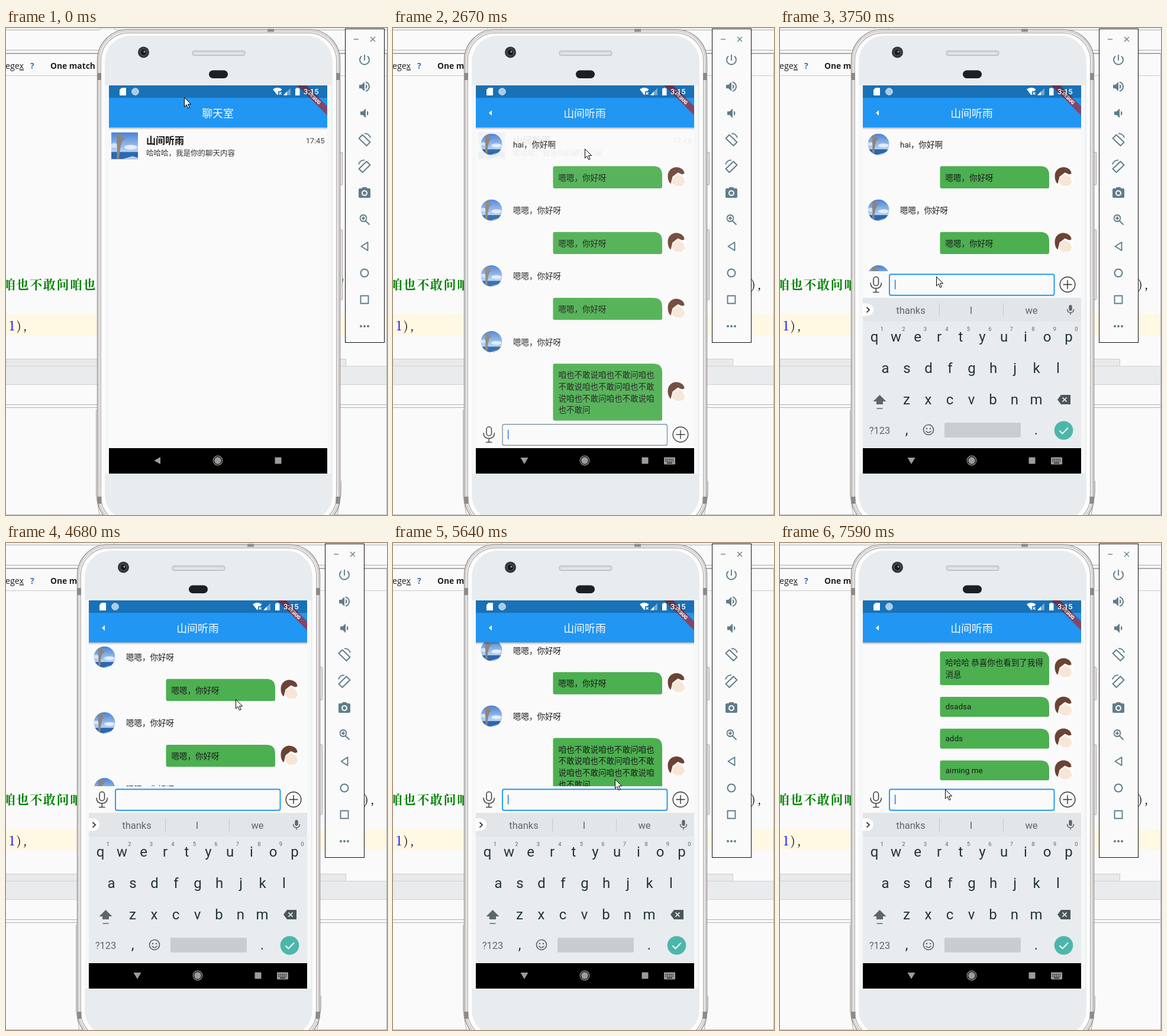
Animation of 644 by 823 pixels, one loop 8 s. Source, as an HTML page:

```html
<!DOCTYPE html>
<html lang="zh">
<head>
<meta charset="utf-8">
<style>
html, body { margin: 0; width: 100%; height: 100%; overflow: hidden; background: #fafafa; }
svg { display: block; width: 100vw; height: 100vh; }
text { font-family: Roboto, "Noto Sans CJK SC", "Noto Sans CJK", sans-serif; white-space: pre; }
.ui { font-family: "Open Sans", "Noto Sans", sans-serif; }
.code { font-family: "Noto Serif CJK SC", "Noto Serif", "Noto Sans CJK SC", serif; }
.mid { text-anchor: middle; }
.end { text-anchor: end; }
</style>
</head>
<body>
<svg id="stage" viewBox="0 0 644 823"></svg>
<script>
const LOOP = 8000, NAME = '山间听雨', BLUE = '#2196f3', STEEL = '#607d8b';

const rect = (x, y, w, h, fill, more = '') =>
  `<rect x="${x}" y="${y}" width="${w}" height="${h}" fill="${fill}" ${more}/>`;
const circle = (x, y, r, fill, more = '') => `<circle cx="${x}" cy="${y}" r="${r}" fill="${fill}" ${more}/>`;
const path = (d, fill, more = '') => `<path d="${d}" fill="${fill}" ${more}/>`;
const line = (d, color, w = 1, more = '') => path(d, 'none', `stroke="${color}" stroke-width="${w}" ${more}`);
const text = (x, y, size, str, fill, more = '') =>
  `<text x="${x}" y="${y}" font-size="${size}" fill="${fill}" ${more}>${str}</text>`;
const at = (x, y, body, more = '') => `<g transform="translate(${x} ${y}) ${more}">${body}</g>`;
const group = (id, body, more = '') => `<g id="${id}" ${more}>${body}</g>`;
const clip = (id, body) => `<clipPath id="${id}">${body}</clipPath>`;

function defs() {
  const shadow = '<stop stop-opacity=".28"/><stop offset="1" stop-opacity="0"/>';
  const sky = '<stop stop-color="#4b82d4"/><stop offset=".7" stop-color="#b4d1f2"/>';
  const down = 'x1="0" y1="0" x2="0" y2="1"';
  return `<defs>
    <linearGradient id="shadow" ${down}>${shadow}</linearGradient>
    <linearGradient id="sky" ${down}>${sky}</linearGradient>
    ${clip('screenClip', rect(140, 97, 369, 656, '#000'))}
    ${clip('listClip', rect(140, 168, 369, 497, '#000', 'id="listBox"'))}
    ${clip('kbClip', rect(140, 456, 369, 254, '#000'))}
    ${clip('round', circle(22.5, 22.5, 22.5, '#000'))}
    <g id="sea">
      ${rect(0, 0, 45, 45, 'url(#sky)')}
      <ellipse cx="33" cy="25" rx="11" ry="4" fill="#e3eefb"/>
      <ellipse cx="5" cy="22" rx="6" ry="4" fill="#d3e4f8"/>
      ${rect(0, 33, 45, 12, '#2d67ad')}
      ${path('M22 44l14-4 9 3v2H20z', '#b9cfe8')}
      ${path('M8 5q6-4 10 0l1 5 5-2-4 6-2 1-3 12-2 17H9l1-17-1-11 1-6z', '#8d857f')}
    </g>
    <g id="girl">
      ${circle(0, 0, 15.5, '#fff')}
      ${path('M-15-2C-15-13-6-18 1-17c8 1 12 6 12 11l-4 1-7-3-9 7-3 12c-3-2-5-7-5-13z', '#6b4335')}
      ${path('M-7 2L2-5l9 5 3 8-5 6-10 1-7-5z', '#f7e6d6')}
    </g>
  </defs>`;
}

function editor() {
  const words = '咱也不敢问咱也不敢说';
  const comment = (words + words + words).slice(0, 25);
  return rect(0, 0, 644, 823, '#fafafa')
    + rect(0, 0, 644, 3, '#f0f0f0')
    + line('M0 3.5H158L161 0M182 0L186 3.5H644', '#b5b5b5')
    + line('M0 37.5H644', '#a8a8a8') + line('M0 43H644', '#8f8f8f', 1.5) + line('M0 80.5H644', '#c9c9c9')
    + text(-1, 69, 14.3, 'ege<tspan text-decoration="underline">x</tspan>', '#222', 'class="ui"')
    + text(41, 69, 14, '?', '#2f6fc4', 'class="ui" font-weight="700"')
    + text(75, 69, 13.8, 'One match', '#222', 'class="ui" font-weight="700"')
    + text(-5, 441, 21, comment, '#008000', 'class="code" font-weight="700" letter-spacing="1.6"')
    + text(566, 441, 21, "'", '#008000', 'class="code" font-weight="700"')
    + text(605, 441, 21, '),', '#111', 'class="code" letter-spacing="4"')
    + rect(0, 484, 644, 35, '#fff8e3')
    + text(5, 511, 21, '1', '#0000ff', 'class="code"')
    + text(18, 511, 21, '),', '#111', 'class="code" letter-spacing="4"')
    + rect(0, 559.5, 574.5, 12, '#e8eaeb', 'stroke="#c8cacb"')
    + rect(0, 571, 644, 31, '#e9ebec')
    + line('M0 571.5H644M0 602.5H644', '#cfd1d2')
    + line('M0 636.5H644M0 641.5H644', '#b0b0b0')
    + line('M643.5 43V822.5H0', '#b8b8b8');
}

function body() {
  const ring = (inset, rx, color, w, fill = 'none') => rect(120 + inset, 2 + inset, 411 - 2 * inset,
    843 - 2 * inset, fill, `rx="${rx}" stroke="${color}" stroke-width="${w}"`);
  const band = (x, y, w, h) => rect(x, y, w, h, '#8d8a8a');
  return rect(530, 210, 4.5, 55, '#e4e2e2', 'stroke="#a5a2a2" rx="1"')
    + rect(530, 341, 4.5, 118, '#e4e2e2', 'stroke="#a5a2a2" rx="1"')
    + line('M118.5 645V790L124 823M532.5 765V786L526 823', '#a8a8a8')
    + ring(.5, 52, '#858282', 1.2, '#f4f2f2') + ring(3, 50, '#d0cbcb', 2) + ring(6.3, 47, '#aaa5a5', 1.2, '#fdfdfd')
    + rect(133, 13, 385, 820, '#e9ecee', 'rx="44"')
    + band(120, 76, 7, 12) + band(524, 76, 7, 12) + band(120.5, 792, 7, 12) + band(523.5, 792, 7, 12)
    + band(408, 1.5, 11, 5)
    + circle(198.5, 41, 9.5, '#34373a') + circle(198.5, 41, 5.5, '#17191b', 'stroke="#64686c"')
    + circle(200, 40, 1.8, '#7e8fa5')
    + rect(281, 38.5, 89, 8, '#d2d8dd', 'rx="3" stroke="#b4b8bc"') + line('M284 43H367', '#e6eaee', 2)
    + rect(309, 71.5, 32, 13.5, '#1b2024', 'rx="6.7"')
    + rect(133, 97, 7, 656, '#f6f7f8') + rect(509, 97, 7, 656, '#f6f7f8');
}

const appBar = title => rect(140, 118, 369, 50, BLUE) + rect(140, 168, 369, 4, 'url(#shadow)')
  + text(324, 150.5, 17.9, title, '#fff', 'class="mid"');

function listPage() {
  return rect(140, 118, 369, 592, '#fafafa') + appBar('聊天室')
    + at(144, 176.5, '<use href="#sea"/>')
    + text(203, 196, 16, NAME, '#111', 'font-weight="700"')
    + text(203, 215.5, 12.5, '哈哈哈，我是你的聊天内容', '#333')
    + text(504.5, 194.5, 12.8, '17:45', '#444', 'class="end"');
}

function messages() {
  const hi = '嗯嗯，你好呀';
  const rows = ['<hai，你好啊', hi, '<' + hi, hi, '<' + hi, hi, '<' + hi,
    '咱也不敢说咱也不敢问咱也|不敢说咱也不敢问咱也不敢|说咱也不敢问咱也不敢说咱|也不敢问',
    '哈哈哈 恭喜你也看到了我得|消息', 'dsadsa', 'adds', 'aiming me'];
  let y = 178;
  return rows.map(row => {
    const left = row[0] === '<', lines = row.replace('<', '').split('|'), n = lines.length;
    const latin = /^[a-z ]+$/.test(row);
    const h = latin ? 33.7 : 17.6 + 19.7 * n;
    const words = lines.map((s, i) =>
      text(left ? 203 : 279.5, y + (latin ? 21.3 : 24) + 19.7 * i, 13.5, s, '#1c1c1c')).join('');
    const out = left
      ? at(148.5, y + .5, '<g clip-path="url(#round)"><use href="#sea"/></g>', 'scale(.8)') + words
      : path(`M273.5 ${y}H440q15 0 15 15V${y + h - 3}q0 3-3 3H273.5q-3 0-3-3V${y + 3}q0-3 3-3z`, '#4caf50')
        + words + at(479.5, y + h / 2, '<use href="#girl"/>');
    y += latin ? 53.7 : n > 1 ? h + 19.7 : 55.6;
    return out;
  }).join('');
}

function chatPage() {
  const glow = path('M140 392Q330 354 509 388V411H140z', BLUE);
  const mic = rect(158, 674, 8.5, 15, 'none', 'rx="4.2" stroke="#444" stroke-width="1.6"')
    + line('M153 684q0 9.5 9.2 9.5t9.2-9.5M162.2 693.5V700M157 700H167.5', '#444', 1.6);
  return rect(140, 118, 369, 592, '#fafafa')
    + `<g clip-path="url(#listClip)">${group('list', messages())}${group('glow', glow)}</g>`
    + appBar(NAME) + path('M162 143.5L167 139V148z', '#fff')
    + group('input', rect(140, 665, 369, 45, '#fafafa') + mic
      + rect(185, 669.8, 278.5, 35.4, '#fafafa', 'id="field" rx="3"')
      + rect(193.8, 679, 1.8, 16, '#4285f4', 'id="caret"')
      + circle(486, 687, 12.8, 'none', 'stroke="#333" stroke-width="1.4"')
      + line('M478.5 687H493.5M486 679.5V694.5', '#333', 1.4));
}

function keyboard() {
  const ink = '#22333a', soft = '#5c676c';
  const key = (x, y, c) => text(x, y, 24, c, ink, 'class="mid"');
  const row = (chars, x, y) => [...chars].map((c, i) => key(x + 36.5 * i, y, c)).join('');
  const hints = [...'1234567890'].map((c, i) => text(172.5 + 36.5 * i, 512, 9.5, c, soft, 'class="mid"')).join('');
  const word = (x, s) => text(x, 482.5, 16.5, s, soft, 'class="mid"');
  return rect(140, 456, 369, 254, '#e8ecee') + rect(140, 456, 369, 40, '#e2e6e9')
    + path('M140 465.5h7.5a10.5 10.5 0 0 1 0 21H140z', '#fff') + line('M146.5 472l4.5 4.3-4.5 4.3', '#333', 1.8)
    + word(221, 'thanks') + word(323, 'I') + word(425, 'we')
    + line('M269.5 465V488M377.5 465V488', '#c3c9cc')
    + rect(488.3, 468, 5.4, 10, soft, 'rx="2.7"') + line('M485.5 475q0 6 5.5 6t5.5-6M491 481v3.5', soft, 1.5)
    + row('qwertyuiop', 159.5, 530) + hints + row('asdfghjkl', 178, 583) + row('zxcvbnm', 214, 636)
    + path('M168.5 620l11 11h-5.5v5h-11v-5h-5.5z', soft) + line('M163.5 643H173.5', soft, 1.5)
    + path('M469 628l6-8h16v16h-16z', '#49575d') + line('M477.5 624.5l7 7m0-7l-7 7', '#fff', 1.6)
    + text(168.5, 686, 16.5, '?123', soft, 'class="mid"') + key(214, 687, ',') + key(433, 687, '.')
    + circle(251, 679, 8.5, 'none', `stroke="${soft}" stroke-width="1.7"`)
    + circle(248, 677, 1.3, soft) + circle(254, 677, 1.3, soft) + line('M246.5 681q4.5 5.5 9 0', soft, 1.5)
    + rect(278, 667, 129, 25, '#c8cdd0', 'rx="2"')
    + circle(479.5, 680, 15.8, '#4db6ac') + line('M472.5 680.5l5 5 9.5-10', '#fff', 1.9);
}

function statusBar() {
  const banner = at(509, 97, rect(-60, 25, 120, 10.8, '#b71c1c', 'fill-opacity=".63"')
    + text(0, 33.3, 8.2, 'DEBUG', '#fff', 'class="mid" font-weight="900"'), 'rotate(45)');
  return rect(140, 97, 369, 21, BLUE) + banner + rect(140, 97, 369, 21, '#000', 'fill-opacity=".25"')
    + path('M161.5 101H168q1 0 1 1v11q0 1-1 1h-9q-1 0-1-1v-8.5z', '#fff')
    + circle(184.5, 107.5, 5.8, '#a9cbe8', 'stroke="#d5e6f5"')
    + path('M417 103.5q7.8-5.5 15.5 0l-2.5 3.2h-4v5l-1.3 1.8z', '#fff')
    + line('M427.5 108.5l4 4m0-4l-4 4', '#fff', 1.3)
    + path('M447 101.5V113.5H435z', '#6fa9d6') + path('M441 107.5V113.5H435z', '#fff')
    + path('M457 101h3.5v1.3h2V114h-7.5v-11.7h2z', '#fff')
    + text(469, 112, 13, '3:15', '#fff', 'font-weight="500"');
}

function navBar() {
  const gray = '#9c9c9c';
  const dots = line('M460.5 729h14M460.5 732h14', '#000', 1.3, 'stroke-dasharray="1.5 1.5"')
    + line('M463 735h9', '#000', 1.3);
  return rect(140, 709, 369, 1, '#fff') + rect(140, 710, 369, 43, '#000')
    + group('back', path('M216.5 731L227 725V737z', gray))
    + group('hide', path('M215.5 726H228.5L222 737z', gray) + rect(458, 725.5, 19, 12, gray, 'rx="1"') + dots)
    + circle(324, 731, 7.8, 'none', `stroke="${gray}" stroke-width="1.2"`) + circle(324, 731, 5.9, gray)
    + rect(420.5, 725.5, 11, 11, gray, 'rx="1"');
}

function toolbar() {
  const icon = (y, d) => at(560, y - 12, path(d, STEEL, 'fill-rule="evenodd"'));
  const drawn = (y, d, flip = 1) => at(572, y, line(d, STEEL, 1.9, 'stroke-linejoin="round"'), `scale(${flip} 1)`);
  const turn = 'M-3.5-8.5L-9.5-2.5L3.5 10L9.5 4zM0-10.500q7-1 10 7'.replace('.500', '.5');
  return rect(539.5, 1.5, 66, 530, '#fafafa', 'stroke="#111"')
    + line('M554 19H562', STEEL, 1.3) + line('M582 15l8 8m0-8l-8 8', STEEL, 1.3)
    + drawn(54, 'M0-9V1M-5-6.5a8 8 0 1 0 10 0')
    + icon(99, 'M3 9v6h4l5 5V4L7 9zM16.5 12c0-1.8-1-3.3-2.5-4v8c1.5-.7 2.5-2.2 2.5-4z'
      + 'M14 3.2v2.1c2.9.9 5 3.5 5 6.7s-2.1 5.9-5 6.7v2.1c4-1 7-4.5 7-8.8s-3-7.9-7-8.8z')
    + icon(144, 'M18.5 12c0-1.8-1-3.3-2.5-4v8c1.5-.7 2.5-2.2 2.5-4zM5 9v6h4l5 5V4L9 9z')
    + drawn(189, turn) + drawn(234, turn, -1)
    + icon(279, 'M9 2L7.2 4H4q-2 0-2 2v12q0 2 2 2h16q2 0 2-2V6q0-2-2-2h-3.2L15 2zM12 7a5 5 0 1 0 .01 0zM12 9a3 3 0 1 1-.01 0z')
    + drawn(324, 'M-2-8a5.5 5.5 0 1 0 .01 0zM2 2L8.5 8.5M-5-2.5H1M-2-5.5V.5')
    + drawn(369, 'M-5.5 0L5.5-7V7z') + drawn(414, 'M0-6.5a6.5 6.5 0 1 0 .01 0z')
    + drawn(459, 'M-6.5-6.5H6.5V6.5H-6.5z')
    + [-6, 0, 6].map(x => circle(572 + x, 504, 2, STEEL)).join('');
}

const stage = document.getElementById('stage');
stage.innerHTML = defs() + editor()
  + group('phone', body() + '<g clip-path="url(#screenClip)">' + listPage() + group('chat', chatPage())
    + `<g clip-path="url(#kbClip)">${group('keys', keyboard())}</g>` + statusBar() + navBar() + '</g>' + toolbar())
  + group('pointer', path('M.5.5V16l3.6-3.5 2.6 6 2.5-1-2.6-5.8h5z', '#fff', 'stroke="#000"'));

const $ = id => document.getElementById(id);
const set = (id, name, value) => $(id).setAttribute(name, value);
const move = (id, x, y) => set(id, 'transform', `translate(${x} ${y})`);
const show = (id, on) => set(id, 'display', on ? 'inline' : 'none');

// The screen refreshes only at these moments: [first, last, count].
const ticks = [[0], [120], [400, 1190, 6], [1460, 2120, 6], [2390], [2670, 3630, 8], [3750],
  [4020, 4950, 8], [5100, 6030, 8], [6180, 6720, 5], [7160], [7590]]
  .flatMap(([a, b, n = 1]) => Array.from({ length: n }, (_, i) => n > 1 ? a + (b - a) * i / (n - 1) : a));

const pointerKeys = [[0, 301, 117], [120, 289, 127], [400, 338, 61], [1190, 304, 61], [1460, 306, 150],
  [1724, 309, 256], [2120, 317, 202], [2390, 324, 204], [2670, 324, 204], [3630, 264, 415], [3750, 264, 420],
  [4020, 270, 427], [4300, 385, 385], [4817, 392, 136], [4950, 391, 146], [5233, 389, 145],
  [5500, 375, 400], [5630, 375, 400], [6030, 354, 215], [6315, 300, 440], [6720, 279, 416]];
const phoneKeys = [[400, 34], [1190, 0]];
const scrollKeys = [[4300, 0], [4817, 236.5], [5630, 236.5], [5960, 500]];
const glowKeys = [[5890, 0], [6030, 1], [6180, .8], [6720, 0]];
const slideKeys = [[2750, 254], [2944, 0]];

function tween(keys, t) {
  const i = keys.findIndex(k => k[0] > t);
  if (i === 0) return keys[0].slice(1);
  if (i < 0) return keys[keys.length - 1].slice(1);
  const a = keys[i - 1], b = keys[i], p = (t - a[0]) / (b[0] - a[0]);
  return a.slice(1).map((v, j) => v + (b[j + 1] - v) * p);
}

function render(time) {
  const t = ticks.filter(s => s <= time + .5).pop();
  const chat = t >= 2670, typing = t > 2750;
  const [glow] = tween(glowKeys, t);
  move('pointer', ...tween(pointerKeys, t).map(Math.round));
  move('phone', Math.round(tween(phoneKeys, t)[0]), 0);
  move('list', 0, -tween(scrollKeys, t)[0]);
  move('keys', 0, tween(slideKeys, t)[0]);
  move('input', 0, typing ? -253.5 : 0);
  set('listBox', 'height', typing ? 243 : 497);
  set('field', 'stroke', typing ? BLUE : '#7890a5');
  set('field', 'stroke-width', typing ? 1.9 : 1.4);
  set('chat', 'opacity', typing ? 1 : .93);
  set('glow', 'opacity', .36 * glow);
  set('glow', 'transform', `translate(0 ${411 * (1 - glow)}) scale(1 ${glow})`);
  set('caret', 'opacity', Math.floor((t - 240) / 485) % 2);
  show('chat', chat);
  show('keys', typing);
  show('back', !chat);
  show('hide', chat);
}

const start = performance.now();
function loop() {
  render((performance.now() - start) % LOOP);
  requestAnimationFrame(loop);
}
loop();
</script>
</body>
</html>
```
